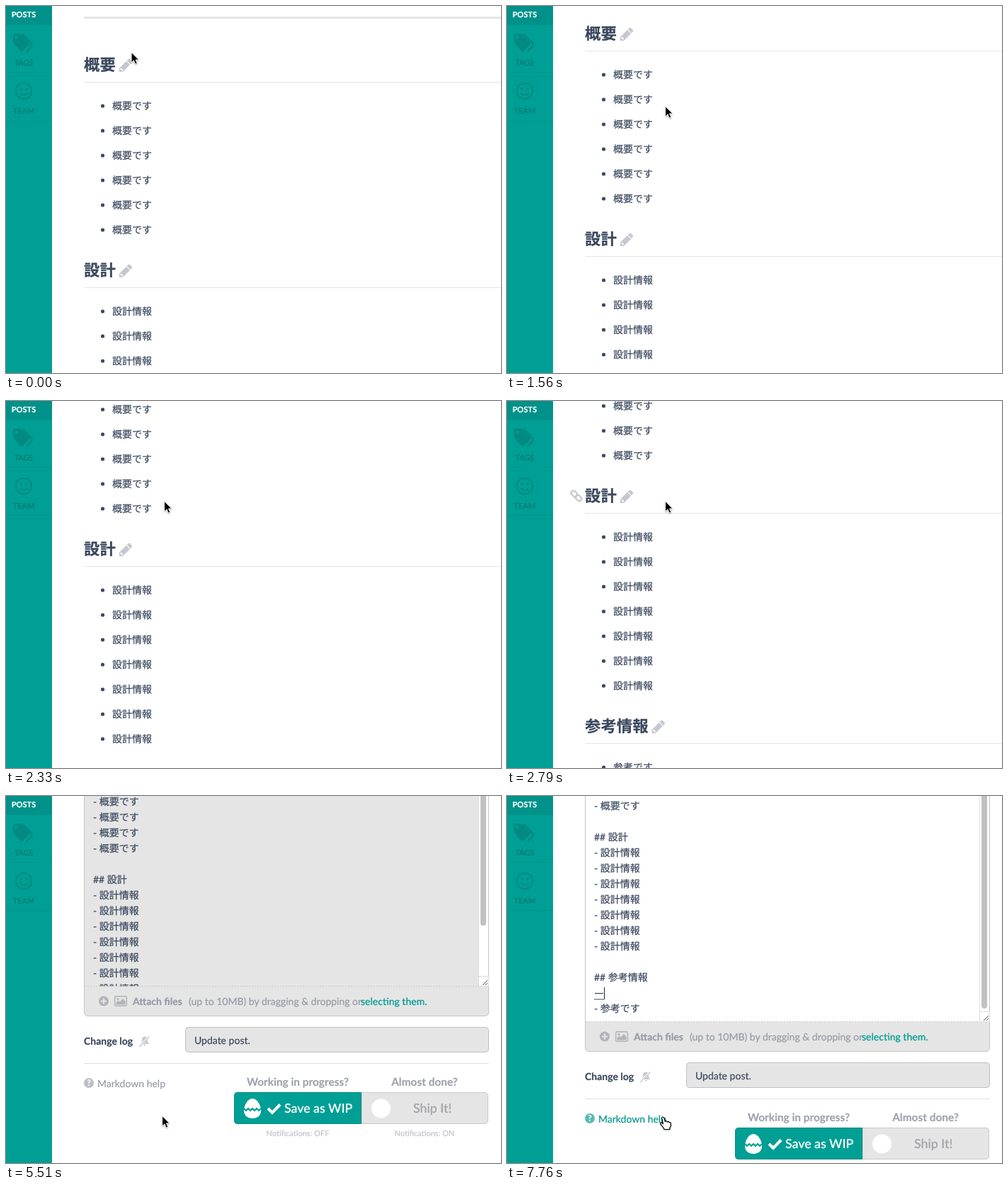
Animation of 699 by 518 pixels, one loop 8000 ms. Source, as an HTML page:

```html
<!DOCTYPE html>
<html lang="ja">
<head>
<meta charset="utf-8">
<style>
  html, body { margin: 0; width: 100%; height: 100%; overflow: hidden; background: #fff; }
  svg { display: block; }
  text {
    font: 14px Lato, "Noto Sans CJK JP", sans-serif; white-space: pre; text-rendering: geometricPrecision;
    color: #3a475d; fill: currentColor; stroke: currentColor; stroke-width: .2px;
  }
  .bold { font-weight: 700; }
  .h2 { font-size: 22.4px; font-weight: 700; }
  .nav { font-size: 11px; text-anchor: middle; color: #007a72; }
  .note { font-size: 11px; text-anchor: middle; color: #bfc2c9; }
  .ask { font-size: 15.4px; font-weight: 700; text-anchor: middle; color: #9fa3ae; }
  .button { font-size: 17.8px; font-weight: 500; }
  .muted { color: #959aa6; }
</style>
</head>
<body>
<svg id="stage" width="699" height="518" viewBox="0 0 699 518"></svg>
<script>
const LOOP = 8000, TEAL = '#009f95', DARK_TEAL = '#008a81', GRAY = '#e5e5e5', ICON = '#c5c8d0';
const stage = document.getElementById('stage');
const $ = id => document.getElementById(id);

const text = (x, y, str, cls = '', style = '') =>
  `<text x="${x}" y="${y}" class="${cls}" style="${style}">${str}</text>`;
const rect = (x, y, w, h, fill, extra = '') =>
  `<rect x="${x}" y="${y}" width="${w}" height="${h}" fill="${fill}" ${extra}/>`;
const path = (d, fill, extra = '') => `<path d="${d}" fill="${fill}" ${extra}/>`;
const line = (d, color, width = 1, extra = '') =>
  path(d, 'none', `stroke="${color}" stroke-width="${width}" ${extra}`);
const circle = (x, y, r, fill, extra = '') =>
  `<circle cx="${x}" cy="${y}" r="${r}" fill="${fill}" ${extra}/>`;

// Article: y is the middle of each heading, in page coordinates
const sections = [
  { title: '概要', item: '概要です', count: 6, y: 83 },
  { title: '設計', item: '設計情報', count: 7, y: 373 },
  { title: '参考情報', item: '参考です', count: 1, y: 698 },
];
for (const s of sections) s.pencilX = 115 + s.title.length * 22.4;

const pencil = (x, y) => path(
  'M0-128v416l832 832 416-416-832-832zM896 1184l166 165q90 75 181 0l235-234q75-91 0-181l-166-166z' +
  'M363 0l91 91-235 235-91-91v-107h128v-128z', ICON,
  `fill-rule="evenodd" transform="translate(${x} ${y + 8.5}) scale(.0122 -.0122)"`);

const chain = (i, y) => `<g id="link${i}" transform="translate(98 ${y}) rotate(45)" fill="none"
  stroke="${ICON}" stroke-width="2.2"><rect x="-9" y="-3.2" width="9.5" height="6.4" rx="3"/>
  <rect x="-.5" y="-3.2" width="9.5" height="6.4" rx="3"/></g>`;

const section = (s, i) => {
  let out = text(110, s.y + 8.3, s.title, 'h2') + pencil(s.pencilX, s.y) + chain(i, s.y)
    + rect(110, s.y + 24, 589, 1, GRAY);
  for (let n = 0; n < s.count; n++) {
    const y = s.y + 58 + 35 * n;
    out += circle(136.5, y, 2.6, '#3c4a60') + text(150, y + 5, s.item);
  }
  return out;
};

const sidebar = rect(0, 0, 65, 518, TEAL) + rect(0, 0, 65, 26, '#00928a')
  + [26, 93, 161].map(y => rect(0, y, 65, 1, '#00948b')).join('')
  + text(25, 16, 'POSTS', 'nav bold', 'color:#fff')
  + line('M23 39.5l13 13q2 2 0 4l-7 8', DARK_TEAL, 2.6)
  + path('M10 41q0-2 2-2h8l12 12q2 2 0 4l-8 8q-2 2-4 0l-10-11z', DARK_TEAL) + circle(14.5, 44, 2.2, TEAL)
  + text(25, 84, 'TAGS', 'nav')
  + circle(25, 120, 11.2, 'none', `stroke="${DARK_TEAL}" stroke-width="2"`)
  + circle(21, 117, 1.8, DARK_TEAL) + circle(29, 117, 1.8, DARK_TEAL)
  + line('M19.5 123q5.5 6 11 0', DARK_TEAL, 2)
  + text(25, 152, 'TEAM', 'nav');

// Markdown source, relative to the "設計" line
const row = (n, str) => text(123, n * 22 + 5, str);
const markdown = [-7, -6, -5, -4, -3, -2].map(n => row(n, '- 概要です')).join('')
  + row(0, '## 設計') + [1, 2, 3, 4, 5, 6, 7].map(n => row(n, '- 設計情報')).join('')
  + row(9, '## 参考情報') + `<g id="tail">${row(10, '- 参考です')}</g>`;

const attachBar = path('M110.5 268.5V305q0 5.5 5.5 5.5H676q5.5 0 5.5-5.5V268.5', GRAY, 'stroke="#c4c4c4"')
  + line('M111 268.5H681', '#c8c8c8', 1, 'stroke-dasharray="2 2"')
  + circle(138, 289.5, 7, '#b2b4ba') + line('M134 289.5h8M138 285.5v8', GRAY, 2.2)
  + rect(153.7, 282.7, 16.6, 13.6, 'none', 'rx="1.5" stroke="#b2b4ba" stroke-width="1.5"')
  + path('M155.5 294.5v-3l3-3 2 2 4.5-4.5 3.5 4v4.5z', '#b2b4ba') + circle(158, 286.5, 1.6, '#b2b4ba')
  + text(179, 295, 'Attach files', 'bold muted')
  + text(258, 295, '(up to 10MB) by dragging &amp; dropping or', 'muted')
  + text(501, 295, 'selecting them.', '', `color:${TEAL};font-weight:500`);

const changeLog = text(110, 351, 'Change log', 'bold')
  + path('M189 350q3-2 3-6 0-4 4-4.500 4 .5 4 4.500 0 4 2 6zM194 351h4q-2 3-4 0', ICON)
  + line('M187.5 353.5l15-14', '#fff', 3) + line('M188 354l14.5-14.5', ICON, 1.5)
  + rect(253.5, 326.5, 428, 35, GRAY, 'rx="4" stroke="#bfbfbf"')
  + text(266, 350, 'Update post.')
  + rect(110, 377, 572, 1, '#e0e0e0');

const help = `<g id="help">${circle(117, 405, 7, 'currentColor', 'opacity=".65"')}
  ${text(117, 409.3, '?', 'bold', 'color:#fff;font-size:12px;text-anchor:middle')}
  ${text(129, 411, 'Markdown help', '', 'color:inherit')}</g>`;

const buttons = text(412, 409, 'Working in progress?', 'ask') + text(591, 409, 'Almost done?', 'ask')
  + path('M502 418.5H676q4.500 0 4.500 4.500V458q0 4.500-4.500 4.500H502z', GRAY, 'stroke="#cacaca"')
  + path('M501.5 418.5H327q-4.500 0-4.500 4.500V458q0 4.500 4.500 4.500H501.5z', TEAL, `stroke="${DARK_TEAL}"`)
  + path('M348 427C355 427 360 437 360 444 360 451 355 455 348 455S336 451 336 444C336 437 341 427 348 427z', '#fff')
  + line('M336 441l3 3 3-3 3 3 3-3 3 3 3-3 3 3 3-3', TEAL, 2)
  + line('M370 441l6 6 11-11.5', '#fff', 4)
  + text(393, 447, 'Save as WIP', 'button', 'color:#fff')
  + circle(529.5, 441, 13.5, '#fff')
  + text(575, 447, 'Ship It!', 'button', 'color:#a3a4a8')
  + text(412, 480, 'Notifications: OFF', 'note') + text(591, 480, 'Notifications: ON', 'note');

const resizer = rect(667.5, 254.5, 14, 14, '#fff', 'stroke="#dcdcdc"')
  + line('M673 267l7-7M677 267l3-3', '#555');

stage.innerHTML = `
  <g id="article">${rect(110, 15, 589, 3, GRAY)}${sections.map(section).join('')}</g>
  <g id="editor">
    <rect id="area" x="110.5" y="-9" width="571" height="340" stroke="#c4c4c4"/>
    <g id="markdown">${markdown}</g>
    <g id="compose">${text(123, 284, 'ー')}${line('M123 287H137', '#3c4a60')}</g>
    <rect id="caret" y="270" width="1" height="17" fill="#222"/>
    ${rect(667, -9, 14, 330, '#fff')}${line('M667.5 0V330', '#e2e2e2')}
    <rect id="thumb" x="670" y="-20" width="8" rx="4" fill="#c1c1c1"/>
    <g id="lower">${rect(100, 269, 590, 249, '#fff')}${attachBar}${resizer}${changeLog}${help}${buttons}</g>
  </g>
  ${sidebar}
  <g id="cursor" style="filter:drop-shadow(0 1px 1px #0005)">
    ${path('M0 0V15.5l3.6-3.4 2.5 5.7 2.7-1.2-2.4-5.5h4.9z', '#000',
      'id="arrow" stroke="#fff" transform="translate(.6 .6) scale(.93)"')}
    ${path('M-1.5 2.5q1.5-3 3.300 0l1.5 5q2-1.5 3 .5 2-1.2 2.700.8 2.2-.8 2.300 1.700v3l-1.5 3v2H2l-1.2-2.5-4.300-5.500q0-2.5 2.300-1.200l1.700 1.900z',
      '#fff', 'id="hand" stroke="#000" stroke-width="1.2" transform="translate(0 1)"')}
  </g>`;

// [time, x, y]
const pointer = [
  [0, 176.5, 65], [60, 176.5, 65], [250, 179, 86], [460, 176, 82], [600, 176, 82],
  [700, 110, 12], [800, 28, 90], [900, 70, 290], [1010, 190, 270], [1120, 223, 141],
  [2930, 223, 141], [2990, 130, 50], [3060, 39, 17], [3140, 90, 250], [3210, 227, 383],
  [3340, 227, 383], [3560, 226, 440], [3720, 216, 496], [3930, 220, 451], [LOOP, 220, 451],
];
// [time, offset]; wheel scrolling jumps
const scroll = [
  [0, 0], [1420, 4], [1490, 18], [1560, 44], [1650, 75], [1740, 104], [1830, 128], [1920, 146],
  [2010, 158], [2090, 162], [2330, 164], [2420, 184], [2510, 206], [2610, 224], [2700, 235], [2790, 239],
];

function pointerAt(t) {
  const i = pointer.findIndex(k => k[0] > t);
  const [t0, x0, y0] = pointer[i - 1], [t1, x1, y1] = pointer[i];
  const p = (t - t0) / (t1 - t0);
  return [x0 + (x1 - x0) * p, y0 + (y1 - y0) * p];
}
const show = (id, on) => { $(id).style.display = on ? '' : 'none'; };
const move = (id, x, y) => $(id).setAttribute('transform', `translate(${x} ${y})`);

function render(t) {
  const editing = t >= 5390, ready = t >= 6250, newline = t >= 6700, typed = t >= 7660;
  const [x, y] = pointerAt(t);
  const offset = scroll.findLast(k => k[0] <= t)[1];
  let hand = editing && (t < 5510 || t >= 6600);

  show('article', !editing);
  show('editor', editing);
  move('article', 0, -offset);
  sections.forEach((s, i) => {
    const dy = y + offset - s.y;
    const hover = !editing && x > 90 && Math.abs(dy) < 17;
    show('link' + i, hover);
    if (hover && Math.abs(dy) < 11 && x > s.pencilX && x < s.pencilX + 19) hand = true;
  });

  if (editing) {
    $('area').setAttribute('fill', ready ? '#fff' : GRAY);
    move('markdown', 0, !ready ? 118 : newline ? 58 : 80);
    move('tail', 0, newline ? 22 : 0);
    move('lower', 0, ready ? 50 : 0);
    $('thumb').setAttribute('height', ready ? 320 : 203);
    $('caret').setAttribute('x', typed ? 137 : newline ? 123 : 198);
    show('caret', ready);
    show('compose', typed);
    const p = Math.min(1, Math.max(0, (t - 6600) / 300));
    const mix = (a, b) => Math.round(a + (b - a) * p);
    $('help').style.color = `rgb(${mix(152, 0)},${mix(156, 150)},${mix(168, 140)})`;
  }
  move('cursor', x, y);
  show('arrow', !hand);
  show('hand', hand);
}

const start = performance.now();
function tick() {
  render((performance.now() - start) % LOOP);
  requestAnimationFrame(tick);
}
tick();
</script>
</body>
</html>
```
